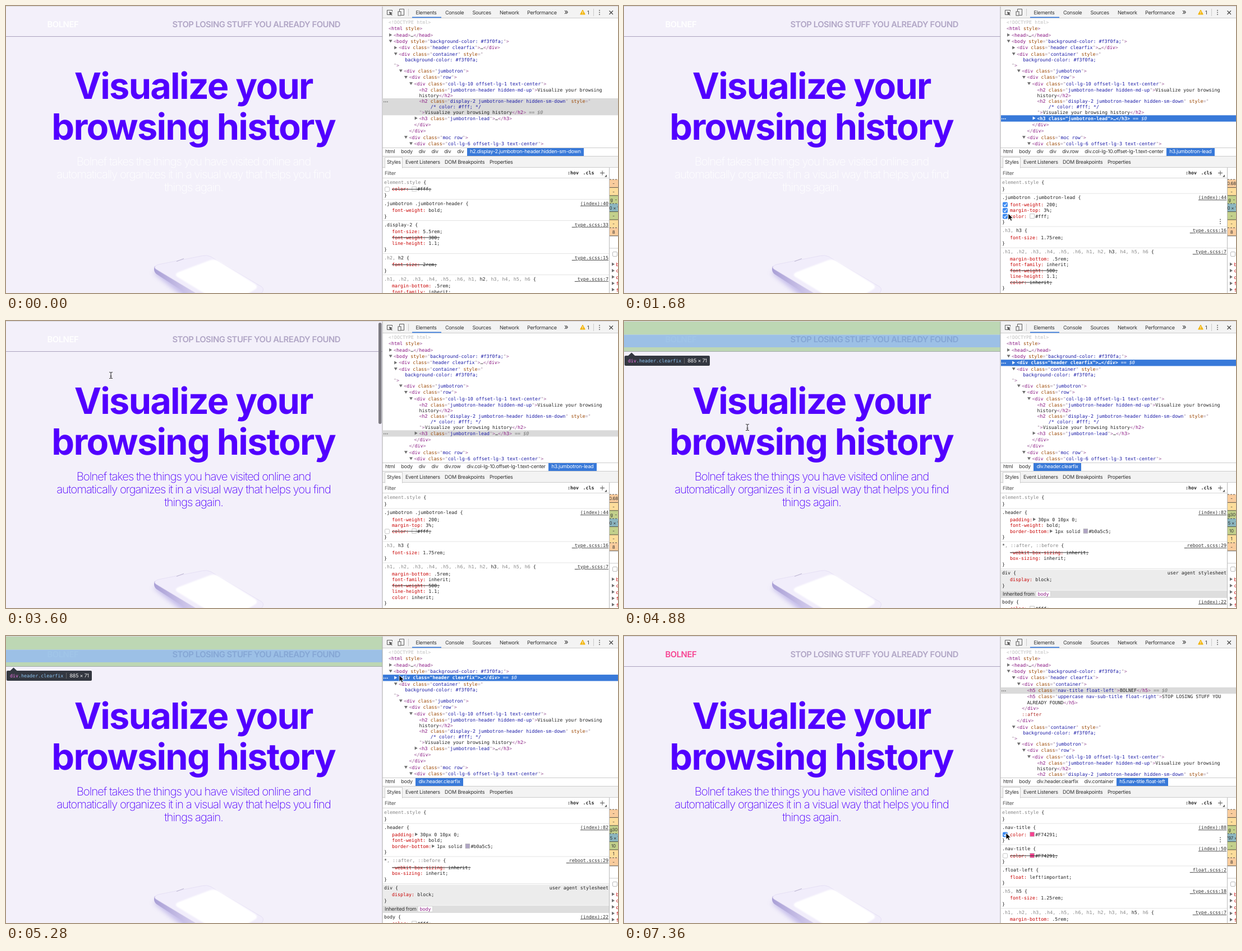
An HTML page for the animation above (8 s loop, 1091x513 px).

```html
<!DOCTYPE html>
<html lang="en">
<head>
<meta charset="utf-8">
<title>Inspector demo</title>
<style>
html, body { margin: 0; width: 100%; height: 100%; overflow: hidden; background: #fff }
body { position: relative }
svg { display: block }
#stage { position: absolute; left: 0; top: 0; width: 1091px; height: 513px }
text { white-space: pre; text-rendering: geometricPrecision; font-optical-sizing: none }
.page { font-family: Inter, sans-serif; letter-spacing: -.031em }
.ui, #crumbs { font: 9.1px Inter, sans-serif; letter-spacing: -.03em; fill: #333; color: #333 }
.mono { font: 8.33px "DejaVu Sans Mono", monospace; fill: #222 }
.bold { font-weight: bold }
.link { text-decoration: underline; fill: #333 }
#crumbs { position: absolute; left: 670.6px; top: 254px; height: 14px; display: flex; line-height: 14px;
  text-rendering: geometricPrecision; font-optical-sizing: none; white-space: pre }
#crumbs span { padding: 0 5.4px }
#crumbs span:last-child { background: #3879d9; color: #fff }
</style>
</head>
<body>
<svg id="stage" viewBox="0 0 1091 513">
  <defs>
    <filter id="soft" x="-30%" y="-30%" width="160%" height="160%"><feGaussianBlur stdDeviation="4"/></filter>
    <filter id="edge"><feGaussianBlur stdDeviation="1"/></filter>
    <linearGradient id="side"><stop offset="0" stop-color="#aaa0d6"/><stop offset="1" stop-color="#e2dcf5"/></linearGradient>
  </defs>
  <g id="view"></g>
  <g id="cursor">
    <path id="arrow" d="M0 0V11.5L2.7 9 4.6 13.2 6.6 12.3 4.8 8.2H8.4Z" fill="#000" stroke="#fff" stroke-width=".8"/>
    <path id="beam" d="M-3-5.5Q0-5.5 0-4Q0-5.5 3-5.5M0-4V4M-3 5.5Q0 5.5 0 4Q0 5.5 3 5.5M-1.5 1.5H1.5" fill="none" stroke="#333" stroke-width="1.1"/>
  </g>
</svg>
<div id="crumbs"></div>
<script>
const LOOP = 8000, CH = 8.33 * .602, BLUE = '#3879d9', INK = '#5200ff', PINK = '#F74291', BRACKET = '#9c5a98';
const NAME = 'Bolnef', $ = id => document.getElementById(id);

// drawing helpers
const esc = s => s.replace(/</g, '&lt;').replace(/>/g, '&gt;');
const span = (fill, s, more = '') => s ? `<tspan fill="${fill}" ${more}>${esc(s)}</tspan>` : '';
const text = (cls, x, y, s, more = '') => `<text class="${cls}" x="${x}" y="${y}" ${more}>${s}</text>`;
const rect = (x, y, w, h, fill, more = '') => `<rect x="${x}" y="${y}" width="${w}" height="${h}" fill="${fill}" ${more}/>`;
const path = (d, fill, more = '') => `<path d="${d}" fill="${fill}" ${more}/>`;
const tri = (x, y, open, fill = '#6e6e6e') =>
  path(open ? `M${x - 3} ${y - 2.5}h6l-3 5z` : `M${x - 2.5} ${y - 3}v6l5-3z`, fill);
const dots = (x, y) => [-3.7, 0, 3.7].map(d => rect(x - .8, y + d - .8, 1.6, 1.6, '#555')).join('');

// element tree: depth, arrow (> closed, v open), markup
const TOP = ['0 <!DOCTYPE html>', '0 <html style>', '1><head>…</head>', '1v<body style="background-color: #f3f0fa;">'];
const CLOSED = ['2><div class="header clearfix">…</div>'];
const OPEN = ['2v<div class="header clearfix">', '3v<div class="container">',
  `4 <h5 class="nav-title float-left">${NAME.toUpperCase()}</h5>`,
  '4 <h5 class="uppercase nav-sub-title float-right">STOP LOSING STUFF YOU\nALREADY FOUND</h5>',
  '3 </div>', '3 ::after', '2 </div>'];
const REST = ['2v<div class="container" style="\n    background-color: #f3f0fa;\n">',
  '3v<div class="jumbotron">', '4v<div class="row">', '5v<div class="col-lg-10 offset-lg-1 text-center">',
  '6 <h2 class="jumbotron-header hidden-md-up">Visualize your browsing\nhistory</h2>',
  '6 <h2 class="display-2 jumbotron-header hidden-sm-down" style="\n    /* color: #fff; */\n">Visualize your browsing history</h2>',
  '6><h3 class="jumbotron-lead">…</h3>', '5 </div>', '4 </div>', '4v<div class="moc row">',
  '5v<div class="col-lg-6 offset-lg-3 text-center">'];

function markup(s, white) {
  const c = (fill, t, more) => span(white ? '#fff' : fill, t, more);
  return s.replace(/(<!.*>)|(<\/?)(\w+)|(\w+)(=")([^"]*)(")|( style)(?=>)|(>)|(::after)|( == \$0)/g,
    (_, doc, lt, tag, attr, eq, val, q, bare, gt, pseudo, zero) =>
      c('#c0c0c0', doc) + c(BRACKET, lt) + c('#881280', tag) + c('#994500', attr) + c('#a894a6', eq) +
      (val || '').split('\n').map(l => c('#1a1aa6', l)).join('\n') + c('#a894a6', q) + c('#994500', bare) +
      c(BRACKET, gt) + c('#b0302a', pseudo) + c('#777', zero, 'font-style="italic" font-weight="normal"'));
}

function tree(s) {
  const rows = [...TOP, ...(s.open ? OPEN : CLOSED), ...REST], pick = rows.find(r => r.includes(s.sel));
  let y = 29, out = '';
  for (const row of rows) {
    const x = 682 + 9.1 * row[0], kind = row[1], on = row === pick, white = on && s.focus;
    const lines = markup(row.slice(2) + (on ? ' == $0' : ''), white).split('\n');
    const h = Math.max(11.35, lines.length * 10.1);
    if (on) out += rect(672, y - 5.3, 419, h, white ? BLUE : '#dadada') +
      [673, 676, 679].map(d => rect(d, y + .2, 1.6, 1.6, white ? '#fff' : '#777')).join('');
    if (kind !== ' ') out += tri(x - 5.5, y, kind === 'v', white ? '#fff' : '#6e6e6e');
    lines.forEach((l, i) => out += text('mono' + (white && kind === '>' ? ' bold' : ''),
      x - (i && kind !== ' ' ? 9.1 : 0), y + 3 + i * 10.05, l, white ? 'style="fill:#fff"' : ''));
    y += h;
  }
  return `<svg x="0" y="22" width="1091" height="231" viewBox="0 22 1091 231">${out}</svg>`;
}

// style rules: selector ([..] is dimmed), link, declarations (! struck, ☐ off, ☑ on)
const family = hit => '[' + '.h1, .h2, .h3, .h4, .h5, .h6, h1, h2, h3, h4, h5, h6'.replace(' ' + hit + ',', ` ]${hit}[,`) + ']';
const EMPTY = ['[element.style]', ''];
const media = (w, ...rest) => [`@media (min-width: ${w}px)\n.container`, ...rest];
const STYLES = {
  title: () => [['[element.style]', '', '☐color: #fff'],
    ['.jumbotron .jumbotron-header', '(index):40', 'font-weight: bold'],
    ['.display-2', '_type.scss:33', 'font-size: 5.5rem', '!font-weight: 300', 'line-height: 1.1'],
    ['[.h2, ]h2', '_type.scss:15', '!font-size: 2rem'],
    [family('h2'), '_type.scss:7', 'margin-bottom: .5rem', 'font-family: inherit']],
  lead: s => [EMPTY,
    ['.jumbotron .jumbotron-lead', '(index):44', ...['font-weight: 200', 'margin-top: 3%'].map(p => (s.hover ? '☑' : '') + p),
      (s.purple ? '☐' : s.hover ? '☑' : '') + 'color: #fff'],
    ['[.h3, ]h3', '_type.scss:16', 'font-size: 1.75rem'],
    [family('h3'), '_type.scss:7', 'margin-bottom: .5rem', 'font-family: inherit', '!font-weight: 500',
      'line-height: 1.1', (s.purple ? '' : '!') + 'color: inherit']],
  header: () => [EMPTY,
    ['.header', '(index):82', 'padding:> 30px 0 10px 0', 'font-weight: bold', 'border-bottom:> 1px solid #b0a5c5'],
    ['*[, ::after, ::before]', '_reboot.scss:29', '!-webkit-box-sizing: inherit', 'box-sizing: inherit'],
    ['div', 'user agent stylesheet', 'display: block'], 'body', ['body', '(index):22', 'color: #fff']],
  grid: () => [EMPTY, media(768, '_grid.scss:24', 'width: 720px', 'max-width: 100%'),
    media(576, '_grid.scss:24', '!width: 540px', '!max-width: 100%'),
    media(768, '_grid.scss:13', 'padding-right: 15px', 'padding-left: 15px')],
  nav: s => [EMPTY, ['.nav-title', '(index):88', (s.pink ? '☑' : '☐') + 'color: ' + PINK],
    ['.nav-title', '(index):50', '☐color: ' + PINK], ['.float-left', '_float.scss:2', 'float: left!important'],
    ['[.h5, ]h5', '_type.scss:18', 'font-size: 1.25rem'], [family('h5'), '_type.scss:7', 'margin-bottom: .5rem']]
};

function declaration(decl, y) {
  const [, flag, name, value] = decl.match(/^([!☐☑]?)([\w-]+:)(.*)$/);
  const raw = (name + value).replace('>', ' '), at = raw.search(/#\w/), full = raw.replace('#', '  #') + ';';
  let out = text('mono', 688, y + 3, span('#c80000', name) + full.slice(name.length));
  if (value[0] === '>') out += tri(690.5 + name.length * CH + 1, y, false);
  if (at > 0) out += rect(688.7 + at * CH, y - 4, 7.6, 7.6, raw.slice(at), 'stroke="#aaa" stroke-width=".7"');
  if (flag === '!' || flag === '☐') out += rect(688, y - .2, full.length * CH, .9, '#222');
  if (flag === '☐') out += rect(675.5, y - 3.7, 8, 8, '#fff', 'rx="1.5" stroke="#b5b5b5" stroke-width=".8"');
  if (flag === '☑') out += rect(675, y - 4.2, 9, 9, '#3b8af2', 'rx="2"') +
    path(`M677 ${y + .4}l2 2.2 3.4-4.6`, 'none', 'stroke="#fff" stroke-width="1.2"');
  return out;
}

function styles(s) {
  let y = 315, out = '';
  STYLES[s.rules](s).forEach((rule, n) => {
    if (typeof rule === 'string') {
      out += rect(672, y - 6, 403, 13, '#dedede') + text('ui', 675, y + 3, 'Inherited from') +
        rect(734.5, y - 5, 26, 10, '#fff', 'rx="1" stroke="#ccc" stroke-width=".7"') +
        text('mono', 737.5, y + 3, span('#881280', rule));
      y += 13.8;
      return;
    }
    const [sel, link, ...decls] = rule, agent = link.startsWith('user');
    if (agent) out += rect(672, y - 5.5, 403, 37, '#ececec');
    if (n) out += rect(672, y - 7.7, 403, .8, '#ddd');
    const lines = sel.split('\n');
    lines.forEach((l, i) => {
      if (i) y += 10;
      const html = l.replace(/\[(.*?)\]/g, (_, t) => span('#888', t)) + (i === lines.length - 1 ? ' {' : '');
      out += text('mono', 674, y + 3, html);
    });
    out += text(agent ? 'mono' : 'mono link', 1074, y + 3, link, 'text-anchor="end"');
    y += 12.2;
    for (const d of decls) { out += declaration(d, y); y += 10.55; }
    out += text('mono', 674, y + 3, '}');
    if (n === 1 && s.hover) out += dots(1063, y - 1);
    y += 15.2;
  });
  return out;
}

function boxModel(s) {
  const tones = ['#f9cc9d', '#fddd9b', '#c3d08b', '#8cb6c0', '#c3d08b', '#fddd9b', '#f9cc9d'];
  const dy = s.rules === 'grid' ? 1.5 : 0, label = (y, t) => text('ui', 1083, y, t, 'text-anchor="middle" style="font-size:8px"');
  let out = rect(1075, 289, 16, 224, '#fff');
  tones.forEach((c, i) => {
    const y = 310 + dy + i * 14.4;
    out += rect(1076, y, 15, 14.5, c) + path(`M1076 ${y}h15`, 'none', `stroke="#333" stroke-width=".8" ${i % 3 ? '' : 'stroke-dasharray="3 2"'}`) +
      label(y + 10.3, s.box[i]);
  });
  out += rect(1076, 410.5 + dy, 15, .8, '#333');
  if (dy) out += label(307, '0') + label(423, '0');
  out += rect(1076, 432.5, 15, 1, '#ccc') + rect(1081.5, 439.5, 8, 8, '#fff', 'rx="1.5" stroke="#aaa" stroke-width=".8"');
  [...'bcdff'].forEach((c, i) => out += tri(1082.5, 461.5 + i * 11.4, false) +
    text('mono', 1087.5, 465 + i * 11.4, span('#c80000', c)));
  return `<svg x="1076" y="289" width="15" height="224" viewBox="1076 289 15 224">${out}</svg>` + rect(1075, 289, 1, 224, '#bbb');
}

function tooltip(x, y, w, tag, cls, size) {
  const cut = x + 6 + (tag + cls).length * CH + 5;
  return path(`M${x + 6} ${y + .5}l6.5-6 6.5 6z`, '#333740') + rect(x, y, w, 18, '#333740', 'rx="2"') +
    text('mono', x + 6, y + 12, span('#ee78e6', tag) + span('#8fc6f2', cls)) +
    rect(cut, y + 4, .8, 10, '#777') + text('ui', cut + 6, y + 12.2, size, 'style="fill:#eee"');
}

const PHONE = path('M262 476Q290 500 318 520H420L300 470Z', '#a094de', 'filter="url(#soft)" opacity=".55"') +
  path('M265 465Q262 474 268 479L322 514H360V500Z', 'url(#side)') +
  path('M267 470Q262 465 272 462L350 446.500Q358 444.500 365 448L456 502Q461 506 456 513H338Z', '#f1edfb', 'stroke="#e2dcf3" stroke-width=".8"') +
  path('M305 484Q299 479 309 475L362 455Q371 451 379 456L444 497Q450 502 445 506L430 515H356Z', '#fff', 'filter="url(#edge)"') +
  path('M304 456.500L317 451.500', 'none', 'stroke="#b9b2cf" stroke-width="1"');

function page(s) {
  // trailing letter-spacing is taken out of the centring
  const mid = (y, size, weight, fill, t, gap) => text('page', 335 + gap * size / 2, y, t,
    `text-anchor="middle" font-size="${size}" font-weight="${weight}" fill="${fill}" style="letter-spacing:${gap}em"`);
  const title = (y, t) => mid(y, 64.7, 700, INK, t, -.026);
  const nav = (x, fill, t) => text('page', x, 38, t, `font-size="14.8" font-weight="600" fill="${fill}"`);
  let out = rect(0, 0, 671, 513, '#f3f0fa') + rect(0, 54, 671, 1, '#aaa1bd') + PHONE +
    nav(73.5, s.pink ? PINK : '#fff', NAME.toUpperCase()) + nav(296.5, '#b0a5c5', 'STOP LOSING STUFF YOU ALREADY FOUND') +
    title(165.5, 'Visualize your') + title(238.7, 'browsing history');
  [`${NAME} takes the things you have visited online and`,
    'automatically organizes it in a visual way that helps you find', 'things again.']
    .forEach((l, i) => out += mid(284.5 + i * 23, 20.4, 200, s.purple ? INK : '#fff', l, -.0515));
  const blue = 'rgba(111,168,220,.66)', green = 'rgba(147,196,125,.55)';
  if (s.over === 'header') out += rect(0, 1, 671, 23.5, green) + rect(0, 24.5, 671, 22.5, blue) + rect(0, 47, 671, 7.5, green) +
    tooltip(1, 62, 152, 'div', '.header.clearfix', '885 × 71');
  if (s.over === 'title') out += rect(74, 24.5, 56.5, 16.5, blue) + rect(74, 41, 56.5, 6, 'rgba(246,178,107,.66)') +
    tooltip(75, 54, 177, 'h5', '.nav-title.float-left', '74.8 × 22');
  if (s.bar) out += rect(664, 3, 5.5, 181, '#7d7b82', 'rx="2.75"');
  return out;
}

function chrome() {
  const tabs = (y, list) => list.map(([x, t]) => text('ui', x, y, t)).join('');
  const line = 'stroke="#5a5a5a" stroke-width="1"';
  return rect(671, 0, 420, 513, '#fff') + rect(671, 0, 420, 21, '#f3f3f3') + rect(671, 21, 420, 1, '#ccc') +
    path('M687 15.500H679.500V7.500H688.500V10', 'none', line) + path('M683 10l6.500 2.500-2.700 1 2 2.500-1 .9-2-2.600-1.400 2.200z', '#5a5a5a') +
    path('M701.500 10V5.500H709.500V16.500H704.500', 'none', line) + rect(699, 10, 5, 7, '#f3f3f3', line) +
    rect(717, 5, 1, 13, '#ccc') + rect(724, 19.5, 52, 1.7, '#3b7ee0') +
    tabs(14.7, [[730.5, 'Elements'], [783, 'Console'], [831.5, 'Sources'], [880, 'Network'], [929, 'Performance'], [1036, '1']]) +
    text('ui', 995, 15, '»', 'style="font-size:13px"') +
    path('M1028 7l4.300 8h-8.600z', '#f2b50c', 'stroke="#f2b50c" stroke-linejoin="round"') + rect(1027.5, 9.5, 1, 3, '#fff') + rect(1027.5, 13.3, 1, 1, '#fff') +
    rect(1047, 5, 1, 13, '#ccc') + dots(1058, 11.5) + path('M1075.500 8.500l6.500 6.500m0-6.500l-6.500 6.500', 'none', 'stroke="#444" stroke-width="1.2"') +
    rect(671, 253, 420, 1, '#ccc') + rect(671, 268, 420, 21, '#f3f3f3') + rect(671, 268, 420, 1, '#ccc') + rect(671, 288, 420, 1, '#ccc') +
    rect(675.5, 270.5, 31, 19, '#fff', 'stroke="#ccc"') + rect(676, 287, 30, 3, '#fff') +
    tabs(282.2, [[679, 'Styles'], [712, 'Event Listeners'], [782, 'DOM Breakpoints'], [862, 'Properties']]) +
    text('ui', 675, 301.5, 'Filter', 'style="fill:#555"') + text('mono bold', 1001, 301.3, ':hov') + text('mono bold', 1028.5, 301.3, '.cls') +
    path('M1059 298.500h8m-4-4v8', 'none', 'stroke="#555"') + path('M1071 301.500v4h-4z', '#555') + rect(671, 307, 404, .8, '#ccc');
}

const CRUMBS = {
  title: 'html body div div div div h2.display-2.jumbotron-header.hidden-sm-down',
  lead: 'html body div div div.row div.col-lg-10.offset-lg-1.text-center h3.jumbotron-lead',
  header: 'html body div.header.clearfix',
  nav: 'html body div.header.clearfix div.container h5.nav-title.float-left'
};

// each step changes some of the state
const STEPS = [
  [0, { sel: 'display-2', crumbs: 'title', rules: 'title', box: ['-', '-', 'g  -', ' 0 × 1', '-', '-', '8'] }],
  [1120, { sel: 'jumbotron-lead', crumbs: 'lead', rules: 'lead', focus: true, box: ['0.68', '-', 'g  -', ' 0 × 1', '-', '-', '8'] }],
  [1520, { hover: true }],
  [2080, { purple: true, focus: false }],
  [2480, { hover: false }],
  [3040, { bar: true }],
  [4400, { bar: false, sel: 'header clearfix', crumbs: 'header', rules: 'header', focus: true, over: 'header',
    box: ['-', '-', 'g30', '35 × 7', '10', '1', '-'] }],
  [5760, { open: true }],
  [6400, { sel: 'nav-title', crumbs: 'nav', rules: 'grid', over: 'title', box: ['-', '-', '-', '90 ×', '-', '-', '-'] }],
  [6880, { rules: 'nav', over: '', box: ['-', '-', 'g  -', '797 ×', '-', '-', '8'] }],
  [7120, { hover: true }],
  [7200, { pink: true, focus: false }]
];
// pointer: time, x, y
const MOVES = [[240, 860, 290], [1040, 745, 201], [1360, 745, 201], [1680, 685, 371], [2480, 685, 371], [2640, 567, 297],
  [2960, 567, 297], [3520, 187, 97], [3640, 187, 97], [3920, 220, 190], [4080, 220, 190], [4400, 730, 74], [4640, 730, 74],
  [4860, 220, 190], [4960, 220, 190], [5260, 701, 70], [5760, 701, 70], [6320, 732, 95], [6800, 732, 95], [7160, 681, 352], [LOOP, 681, 352]];

const start = performance.now();
let shown = -1;
function frame() {
  const t = (performance.now() - start) % LOOP, past = STEPS.filter(s => s[0] <= t);
  if (past.length !== shown) {
    shown = past.length;
    const s = Object.assign({}, ...past.map(p => p[1]));
    $('view').innerHTML = page(s) + chrome() + tree(s) + styles(s) + boxModel(s) +
      rect(670.5, 0, 1, 513, '#a8a8a8') + rect(0, 0, 1091, 1, '#d8d6dc');
    $('crumbs').innerHTML = CRUMBS[s.crumbs].split(' ').map(c => `<span>${c}</span>`).join('');
  }
  const i = Math.max(1, MOVES.findIndex(m => m[0] > t)), [t0, x0, y0] = MOVES[i - 1], [t1, x1, y1] = MOVES[i];
  const u = Math.min(1, Math.max(0, (t - t0) / (t1 - t0))), k = u * u * (3 - 2 * u);
  const x = x0 + (x1 - x0) * k, y = y0 + (y1 - y0) * k, inPage = x < 671;
  $('cursor').setAttribute('transform', `translate(${x} ${y})`);
  $('cursor').style.display = t < 240 ? 'none' : '';
  $('arrow').style.display = inPage ? 'none' : '';
  $('beam').style.display = inPage ? '' : 'none';
  requestAnimationFrame(frame);
}
frame();
</script>
</body>
</html>
```
